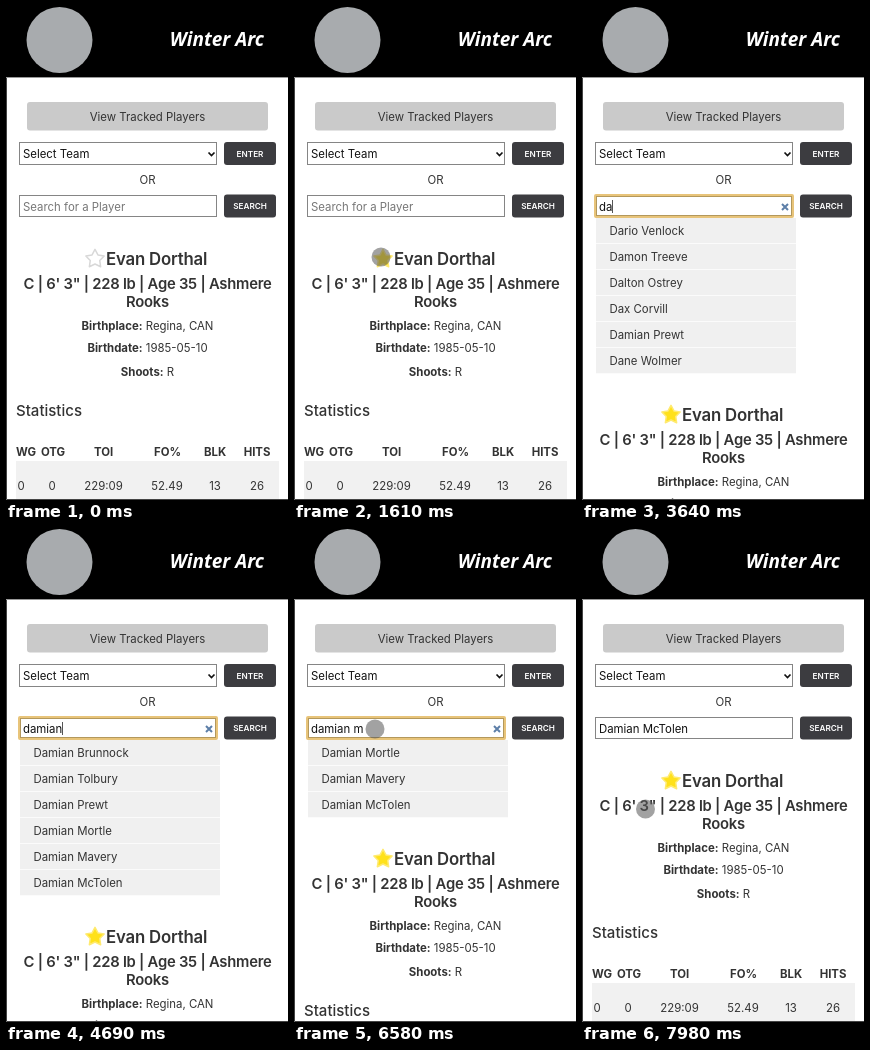
Animation of 282x494 px, one loop 8 s. Source, as an HTML page:

```html
<!DOCTYPE html>
<html lang="en">
<head>
<meta charset="utf-8">
<title>Player search</title>
<style>
  html, body { margin: 0; width: 100%; height: 100%; overflow: hidden; background: #fff; }
  svg { display: block; width: 282px; height: 494px; }
  text { font: 11.4px Inter, Roboto, sans-serif; fill: #333; white-space: pre; }
  .brand { font: italic 700 19px "Open Sans", sans-serif; fill: #fff; }
  .btn { font-size: 8.2px; font-weight: 600; fill: #fff; }
  .name { font-size: 16.8px; font-weight: 600; letter-spacing: -.2px; }
  .info { font-size: 14.8px; font-weight: 600; letter-spacing: -.24px; }
  .title { font-size: 15px; font-weight: 500; }
  .bold { font-weight: 700; }
  .mid { text-anchor: middle; }
  .end { text-anchor: end; }
  .ink { fill: #111; }
  .hint { fill: #777; }
</style>
</head>
<body>
<svg viewBox="0 0 282 494">
  <g id="card">
    <polygon id="star" stroke-width="1.5" stroke-linejoin="round"/>
    <text class="name" x="100" y="259">Evan Dorthal</text>
    <text class="info mid" x="141.5" y="283">C | 6' 3" | 228 lb | Age 35 | Ashmere</text>
    <text class="info mid" x="141.5" y="301">Rooks</text>
    <text class="mid" x="141.5" y="323.5"><tspan class="bold">Birthplace:</tspan> Regina, CAN</text>
    <text class="mid" x="141.5" y="345.5"><tspan class="bold">Birthdate:</tspan> 1985-05-10</text>
    <text class="mid" x="141.5" y="369.5"><tspan class="bold">Shoots:</tspan> R</text>
    <text class="title" x="10" y="410">Statistics</text>
    <rect x="10" y="455" width="263" height="50" fill="#f1f1f1"/>
    <g id="stats"></g>
  </g>

  <rect width="282" height="71.4"/>
  <circle cx="53.5" cy="34" r="33" fill="#a8abae"/>
  <text class="brand end" x="258" y="40">Winter Arc</text>

  <rect x="21" y="96" width="241" height="28.5" rx="3" fill="#cacaca"/>
  <text class="mid" x="141.5" y="115">View Tracked Players</text>
  <rect x="13.5" y="136.5" width="197" height="22" fill="#fff" stroke="#858585"/>
  <text class="ink" x="17" y="152">Select Team</text>
  <path d="M202.5 146.5l3 3 3-3" fill="none" stroke="#111" stroke-width="1.7"/>
  <rect x="218" y="136" width="52" height="23" rx="3" fill="#3c3c40"/>
  <text class="btn mid" x="244" y="150.6">ENTER</text>
  <text class="mid" x="141.5" y="178">OR</text>

  <rect x="13.5" y="189.5" width="197" height="21" fill="#fff" stroke="#858585"/>
  <g id="ring" fill="none">
    <rect x="13" y="189" width="198" height="22" rx="1" stroke="#e8c47a" stroke-width="2"/>
    <rect x="14.5" y="190.5" width="195" height="19" stroke="#b3985c"/>
  </g>
  <text id="typed" x="17" y="205"></text>
  <rect id="caret" y="194" width="1" height="13" fill="#555"/>
  <path id="clear" d="M200 198l6 6m0-6l-6 6" stroke="#5d7fa8" stroke-width="2"/>
  <rect x="218" y="188.5" width="52" height="23" rx="3" fill="#3c3c40"/>
  <text class="btn mid" x="244" y="203">SEARCH</text>
  <g id="list"></g>

  <circle id="ripple" fill="#777"/>
  <circle id="pointer" r="9.5" fill="#5a5a5a" fill-opacity=".56"/>
  <path d="M.5 72V493.5H282" fill="none" stroke="#444"/>
</svg>
<script>
const LOOP = 8000, STEP = 70, ROW = 26;
const $ = id => document.getElementById(id);
const set = (el, attrs) => { for (const k in attrs) el.setAttribute(k, attrs[k]); };
const show = (el, on) => set(el, { visibility: on ? 'visible' : 'hidden' });

function add(parent, tag, attrs, label = '') {
  const el = document.createElementNS('http://www.w3.org/2000/svg', tag);
  set(el, attrs);
  el.textContent = label;
  parent.append(el);
  return el;
}

// Static parts built from short tables
const columns = [['WG', 20, '0', 15], ['OTG', 47, '0', 46], ['TOI', 97.5, '229:09', 97.5],
  ['FO%', 161.5, '52.49', 161], ['BLK', 209, '13', 209], ['HITS', 251, '26', 251]];
for (const [head, hx, value, vx] of columns) {
  add($('stats'), 'text', { class: 'bold mid', x: hx, y: 449.6 }, head);
  add($('stats'), 'text', { class: 'mid', x: vx, y: 483.6 }, value);
}
set($('star'), {
  points: Array.from({ length: 10 }, (_, i) => {
    const a = i * Math.PI / 5 - Math.PI / 2, r = i % 2 ? 5 : 9.6;
    return `${(89 + r * Math.cos(a)).toFixed(2)},${(253 + r * Math.sin(a)).toFixed(2)}`;
  }).join(' ')
});
const rows = Array.from({ length: 6 }, (_, i) => {
  const g = add($('list'), 'g', {});
  add(g, 'rect', { x: 14, y: 212 + i * ROW, width: 200, height: ROW - .7, fill: '#f0f0f0' });
  return { g, label: add(g, 'text', { x: 27.5, y: 229 + i * ROW }) };
});

// Timed states: [start, value]
const finals = ['Brunnock', 'Tolbury', 'Prewt', 'Mortle', 'Mavery', 'McTolen'].map(n => 'Damian ' + n);
const early = ['Dario Venlock', 'Dalton Prusk', 'Davin Okerby', 'Dag Ulvesten', 'Damon Treeve', 'Daven Holbrisk'];
const later = ['Dario Venlock', 'Damon Treeve', 'Dalton Ostrey', 'Dax Corvill', 'Damian Prewt', 'Dane Wolmer'];
const close = ['Damon Treeve', 'Damian Prewt', 'Damir Ostrey', 'Damian Tolbury', 'Damek Corvill', 'Damian Mavery'];
const texts = [[0, ''], [3290, 'd'], [3430, 'da'], [3780, 'dam'], [4270, 'dami'], [4480, 'damia'],
  [4690, 'damian'], [5460, 'damian '], [5740, 'damian m'], [7350, finals[5]]];
const lists = [[0, []], [3500, early], [3640, later], [3850, close], [4270, finals],
  [5810, finals.slice(3)], [7350, []]];
const carets = [[0, false], [2660, true], [3150, false], [3290, true], [5250, false], [5460, true], [6230, false]];
const path = [[490, 150, 505], [840, 118, 308], [910, 107, 285], [1120, 87, 251], [1890, 87, 251],
  [2100, 80, 197], [2170, 81, 201], [6580, 81, 201], [6650, 62, 207], [6790, 18, 237],
  [6930, 18, 237], [7140, 63.5, 281]];
const taps = [[1260, 210], [2310, 350], [7210, 280]];

const at = (table, t) => table.filter(row => row[0] <= t).pop()[1];
const between = (t, a, b) => t >= a && t < b;

function pointerAt(t) {
  const i = path.findIndex(p => p[0] > t);
  if (i < 0) return path[path.length - 1].slice(1);
  if (i === 0) return path[0].slice(1);
  const [t0, x0, y0] = path[i - 1], [t1, x1, y1] = path[i];
  const k = (t - t0) / (t1 - t0);
  return [x0 + (x1 - x0) * k, y0 + (y1 - y0) * k];
}

function draw(t) {
  const names = at(lists, t), text = at(texts, t), focus = between(t, 2450, 7350);

  rows.forEach(({ g, label }, i) => {
    g.style.display = i < names.length ? '' : 'none';
    label.textContent = names[i] || '';
  });
  set($('card'), { transform: `translate(0 ${names.length * ROW})` });
  set($('star'), t >= 1470 ? { fill: '#ffe11a', stroke: '#ffea70' } : { fill: '#fff', stroke: '#d8d8d8' });

  show($('ring'), focus);
  $('typed').textContent = text || 'Search for a Player';
  set($('typed'), { class: text ? 'ink' : 'hint' });
  set($('caret'), { x: Math.round(17 + (text ? $('typed').getComputedTextLength() : 0)) });
  show($('caret'), at(carets, t));
  show($('clear'), focus && text);

  const [cx, cy] = pointerAt(t);
  set($('pointer'), { cx, cy });
  show($('pointer'), between(t, 490, 3290) || t >= 6580);

  const tap = taps.find(([start, span]) => between(t, start, start + span));
  show($('ripple'), tap);
  if (tap) {
    const k = (t - tap[0] + STEP) / tap[1];
    set($('ripple'), { cx, cy, r: 10 + 12 * Math.min(1, k * 1.4), opacity: .45 * (1.1 - k) });
  }
}

const start = performance.now();
function tick() {
  const t = (performance.now() - start) % LOOP;
  draw(Math.floor(t / STEP) * STEP);
  requestAnimationFrame(tick);
}
tick();
</script>
</body>
</html>
```
